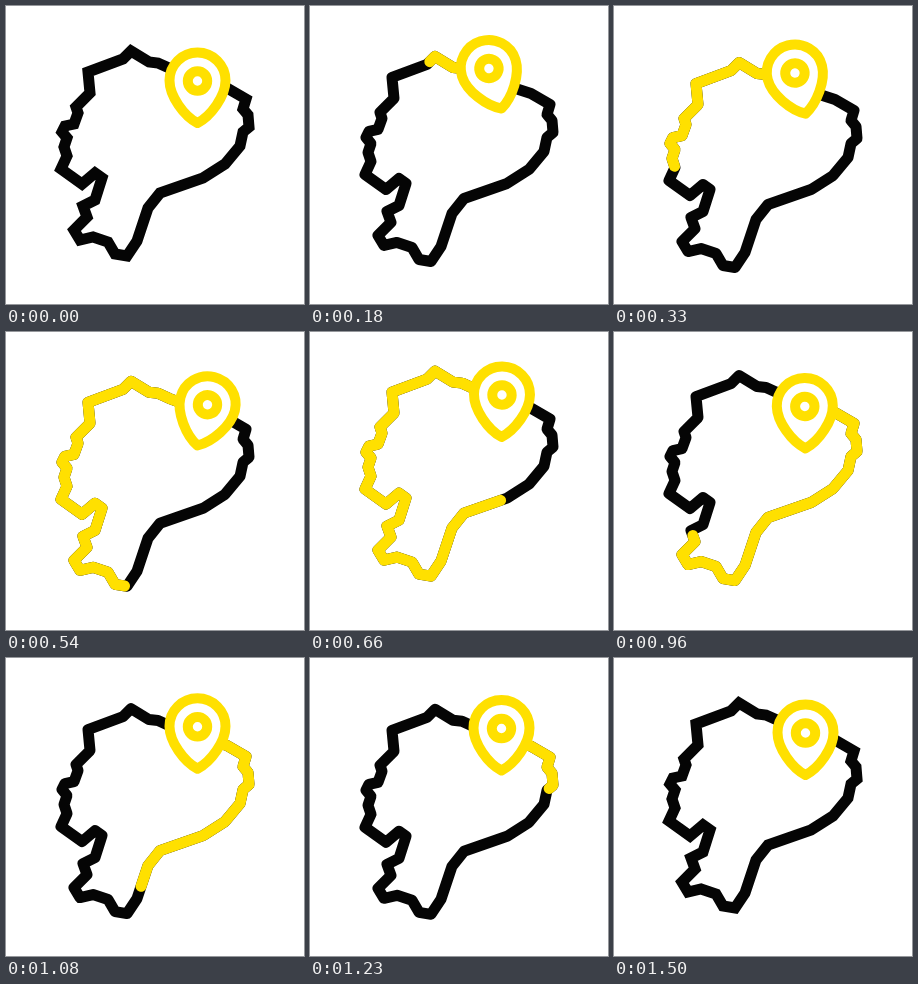
An HTML page that plays this animation: 298 by 298 pixels, repeating every 1.83 s.

```html
<!DOCTYPE html>
<html>
<head>
<meta charset="utf-8">
<style>
  html, body { margin: 0; height: 100%; overflow: hidden; background: #fff; }
  svg { display: block; width: 100vw; height: 100vh; }
</style>
</head>
<body>
<svg viewBox="0 0 298 298" fill="none" stroke-linejoin="round" stroke-linecap="round">
  <g id="map" stroke-width="11">
    <path id="border" stroke="#050505" d="M190 72 163 62 152 57 143 56 125 45 117 53 82 66 84 87 70 101 72 107 68 118 59 120 56 126 61 132 58 141 61 150 55 163 76 178 89 167 96 172 89 194 77 200 81 211 68 224 74 234 87 231 102 236 109 248 121 250 131 235 142 202 154 187 197 172 219 158 234 140 237 126 243 121 242 109 237 103 240 93 221 82Z"/>
    <path id="trace" stroke="#ffe000" pathLength="1"/>
  </g>
  <g id="pin" stroke="#ffe000" stroke-width="10">
    <path fill="#fff" d="M191.500 117C178 110 163.500 90 163.500 74.500A28 28 0 0 1 219.500 74.500C219.500 90 205 110 191.500 117Z"/>
    <circle cx="191.500" cy="75" r="9.700"/>
  </g>
</svg>
<script>
const LOOP = 1830, STEP = 30, REST = 1500;
const [map, border, trace, pin] = ['map', 'border', 'trace', 'pin'].map(id => document.getElementById(id));
trace.setAttribute('d', border.getAttribute('d'));

const ramp = (t, from, to) => Math.min(1, Math.max(0, (t - from) / (to - from)));
const fade = (x, power) => Math.max(0, 1 - x) ** power;

// Swings to alternating sides, one turn per beat, dying out over four beats
function swing(t, size, beat, power) {
  const turn = k => k && -size * (-1) ** k * fade(k / 4, power);
  const k = Math.floor(t / beat);
  const ease = (1 - Math.cos(Math.PI * (t / beat - k))) / 2;
  return turn(k) + (turn(k + 1) - turn(k)) * ease;
}

// Hops that get lower, three in all
const hop = (t, height, beat) =>
  height * Math.sin(Math.PI * t / beat) ** 2 * fade(t / beat / 3, 0.5);

function draw(now) {
  const t = Math.floor(now % LOOP / STEP) * STEP;
  const moving = t > 0 && t < REST;
  const head = ramp(t, 97, 833), tail = ramp(t, 638, 1318);
  const drop = moving ? swing(t, 14, 384, 0.5) : 0;
  map.setAttribute('transform', `translate(0 ${drop})`);
  pin.setAttribute('transform', `translate(0 ${-hop(t, 17.5, 462)}) rotate(${swing(t, -29, 255, 1)} 191.5 117)`);
  border.setAttribute('stroke-linejoin', moving ? 'round' : 'miter');
  trace.setAttribute('stroke-dasharray', `${head - tail} 2`);
  trace.setAttribute('stroke-dashoffset', -tail);
  trace.setAttribute('visibility', head > tail ? 'visible' : 'hidden');
}

const start = performance.now();
function tick() {
  draw(performance.now() - start);
  requestAnimationFrame(tick);
}
tick();
</script>
</body>
</html>
```
